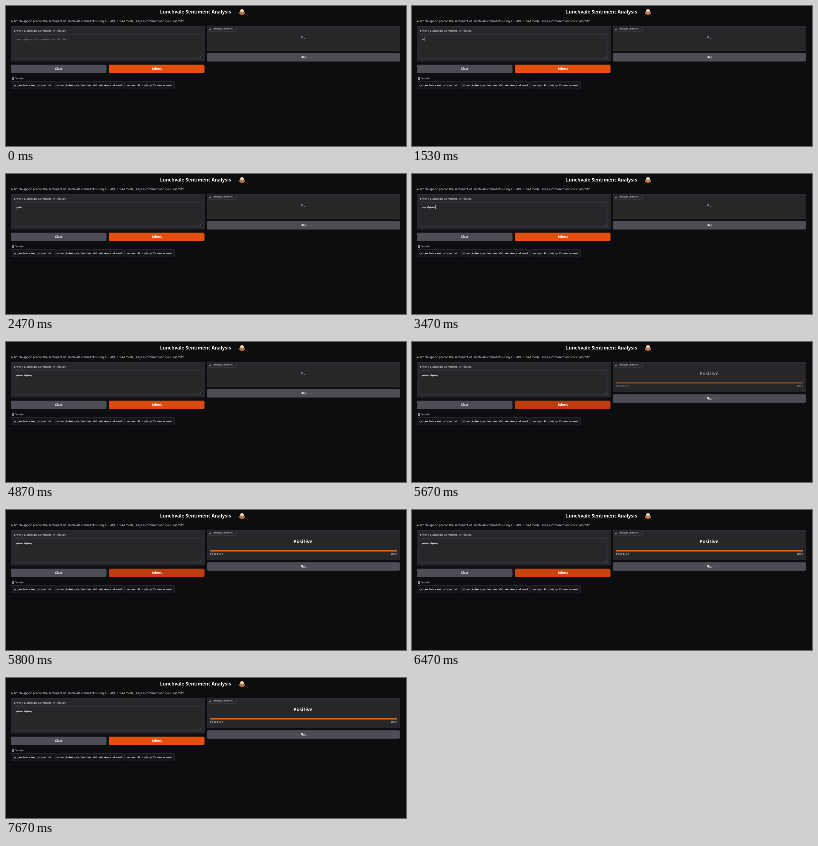
An HTML page with a canvas that plays this animation: 400 by 140 pixels, repeating every 8 s.

```html
<!DOCTYPE html>
<html lang="en">
<head>
<meta charset="utf-8">
<title>Sentiment demo</title>
<style>
html, body { margin: 0; width: 100%; height: 100%; overflow: hidden; background: #0c0d0f; }
canvas { display: block; width: 400px; height: 140px; }
</style>
</head>
<body>
<canvas id="stage" width="1600" height="560"></canvas>
<script>
const ctx = document.getElementById('stage').getContext('2d');
const LOOP = 8000;
const SANS = '"Noto Sans", "Open Sans", sans-serif';
const MONO = '"DejaVu Sans Mono", monospace';
const PERSIAN = '"DejaVu Sans", sans-serif';

const PAGE = '#0c0d0f', PANEL = '#27272a', EDGE = '#3f3f46', GRAY = '#4d4d56';
const WHITE = '#f4f4f5', SOFT = '#d8d8dc', DIM = '#71717a', ORANGE = '#f0701a';

const COMMENT = 'پیشنهاد میکنم';
const KEYS = [1530, 1670, 1740, 1870, 2670, 2800, 3000, 3130, 3330, 3470, 3670, 3930, 4070];
const CARET = [[1070, 2470], [2670, 4670], [5270, 5330], [7670, 8000]];
const EXAMPLES = [
  [5, 44.5, 'غذا خیلی دیر رسید و کاملا سرد بود'],
  [50.5, 67, 'کیفیت غذا و بسته بندی عالی بود، حتما دوباره سفارش می دم'],
  [118.5, 50, 'قیمت ها کمی بالا بود ولی در کل خوب بود']
];

const clamp = v => Math.max(0, Math.min(1, v));
const ramp = (t, a, b) => clamp((t - a) / (b - a));

function box(x, y, w, h, r, fill, stroke) {
  ctx.beginPath();
  ctx.roundRect(x, y, w, h, r);
  ctx.fillStyle = fill;
  ctx.fill();
  if (stroke) {
    ctx.strokeStyle = stroke;
    ctx.lineWidth = 0.3;
    ctx.stroke();
  }
}

function disc(x, y, r, fill) {
  ctx.beginPath();
  ctx.arc(x, y, r, 0, Math.PI * 2);
  ctx.fillStyle = fill;
  ctx.fill();
}

function line(x1, y1, x2, y2, color, width) {
  ctx.beginPath();
  ctx.moveTo(x1, y1);
  ctx.lineTo(x2, y2);
  ctx.strokeStyle = color;
  ctx.lineWidth = width;
  ctx.stroke();
}

function text(str, x, y, size, color, { align = 'left', weight = 400, font = SANS } = {}) {
  ctx.font = `${weight} ${size}px ${font}`;
  ctx.textAlign = align;
  ctx.textBaseline = 'middle';
  ctx.fillStyle = color;
  ctx.fillText(str, x, y);
  return ctx.measureText(str).width;
}

function button(x, y, w, h, label, fill) {
  box(x, y, w, h, 1.3, fill);
  text(label, x + w / 2, y + h / 2 + 0.1, 2.9, WHITE, { align: 'center', weight: 600 });
}

function heading() {
  text('Lunchvale Sentiment Analysis', 154, 6.2, 4.75, WHITE, { weight: 700 });
  // small bowl
  disc(236, 5.2, 2.1, '#d9cbb5');
  ctx.beginPath();
  ctx.arc(236, 5.8, 3.1, 0, Math.PI);
  ctx.fillStyle = '#b9713f';
  ctx.fill();
  text("A simple app to predict the sentiment of Lunchvale comments using a TF-IDF + SVM model. Type a comment and click 'Submit'!",
    5, 15.3, 2.92, SOFT);
}

function inputPanel(t) {
  box(5, 20.2, 194, 35, 1.3, PANEL, EDGE);
  text('Enter a Lunchvale Comment (in Persian)', 8, 25, 2.8, SOFT);
  box(8.2, 28.6, 187.6, 23.8, 1.2, PANEL, EDGE);
  line(193.6, 51.6, 195, 50.2, DIM, 0.25);
  line(194.5, 51.6, 195, 51.1, DIM, 0.25);

  const typed = COMMENT.slice(0, KEYS.filter(k => t >= k).length);
  const opts = { font: PERSIAN };
  let width = 0;
  if (typed) width = text(typed, 10, 33, 2.85, WHITE, opts);
  else text('مثلا: غذا خیلی خوشمزه بود و به موقع رسید', 10.5, 33, 2.75, DIM, opts);

  if (CARET.some(([on, off]) => t >= on && t < off)) {
    // the last click lands between the two words
    if (t >= 7670) width = ctx.measureText('میکنم').width + 0.3;
    line(10.1 + width, 31.2, 10.1 + width, 35, WHITE, 0.3);
  }
}

function submitColor(t) {
  const k = ramp(t, 4800, 5070) - ramp(t, 6370, 6670);
  const mix = (a, b) => Math.round(a + (b - a) * k);
  return `rgb(${mix(226, 188)},${mix(80, 60)},${mix(12, 13)})`;
}

function emptyIcon() {
  ctx.strokeStyle = '#8b8b93';
  ctx.lineWidth = 0.4;
  ctx.beginPath();
  ctx.arc(296.2, 31.2, 0.8, 0, Math.PI * 2);
  ctx.stroke();
  line(295.3, 32.9, 298.7, 32.9, '#8b8b93', 0.4);
  line(297.7, 31.4, 298.7, 32.9, '#8b8b93', 0.4);
}

function loader() {
  for (const y of [31.1, 32.9]) {
    ctx.beginPath();
    ctx.moveTo(295, y);
    ctx.lineTo(297, y - 1);
    ctx.lineTo(299, y);
    ctx.lineTo(297, y + 1);
    ctx.closePath();
    ctx.fillStyle = y < 32 ? '#a94a20' : '#7c3516';
    ctx.fill();
  }
  text('processing | 0.0/0.1s', 393, 40.3, 2.6, '#a1a1aa', { align: 'right', font: MONO });
}

function result(alpha) {
  ctx.globalAlpha = alpha;
  text('Positive', 297, 32, 4.8, WHITE, { align: 'center', weight: 700 });
  box(204, 40.3, 187, 1.2, 0.5, ORANGE);
  text('Positive', 204, 44.1, 2.75, SOFT, { font: MONO });
  text('100%', 391, 44.1, 2.75, SOFT, { align: 'right', font: MONO });
  ctx.globalAlpha = 1;
}

function outputPanel(t) {
  const done = t >= 5670;
  const bottom = done ? 50 : 44.8;
  const busy = t >= 5600 && !done;
  box(201, 20.2, 193, bottom - 20.2, 1.3, busy ? '#232326' : PANEL, EDGE);
  box(201, 20.2, 29.5, 5.2, [1.3, 0, 1.3, 0], PANEL, EDGE);
  line(203.2, 22, 205.3, 22, SOFT, 0.3);
  line(203.2, 23.6, 204.8, 23.6, SOFT, 0.3);
  text('Predicted Sentiment', 207, 22.9, 2.05, SOFT);

  if (done) result(0.5 + 0.5 * ramp(t, 5670, 5800));
  else if (busy) loader();
  else emptyIcon();

  button(201, bottom + 2.3, 193, 8.4, 'Flag', GRAY);
}

function examples() {
  for (const y of [71.5, 72.5, 73.5]) line(5.8, y, 7.8, y, SOFT, 0.3);
  text('Examples', 8.8, 72.5, 2.1, SOFT);
  for (const [x, w, str] of EXAMPLES) {
    box(x, 75.4, w, 7.4, 1.2, '#151518', '#303035');
    text(str, x + w / 2, 79.1, 2.6, WHITE, { align: 'center', font: PERSIAN });
  }
}

function draw(t) {
  ctx.setTransform(4, 0, 0, 4, 0, 0);
  ctx.fillStyle = PAGE;
  ctx.fillRect(0, 0, 400, 140);
  heading();
  inputPanel(t);
  button(5, 58.6, 95.5, 8.6, 'Clear', GRAY);
  button(103, 58.6, 95.5, 8.6, 'Submit', submitColor(t));
  outputPanel(t);
  examples();
}

const start = performance.now();
function tick() {
  draw((performance.now() - start) % LOOP);
  requestAnimationFrame(tick);
}
tick();
</script>
</body>
</html>
```
